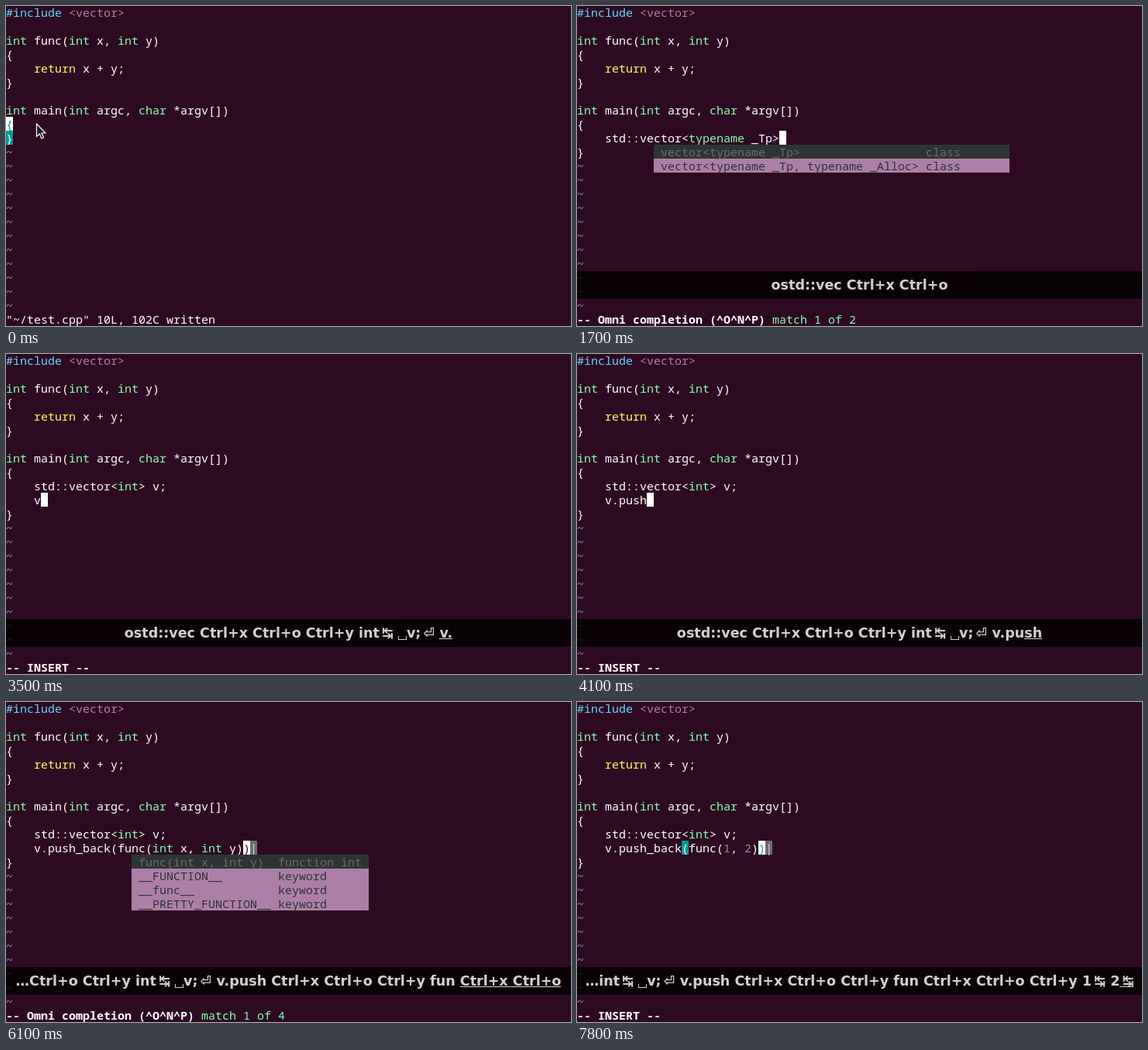
An HTML page for the animation above (8 s loop, 729 by 413 pixels).

```html
<!DOCTYPE html>
<html lang="en">
<head>
<meta charset="utf-8">
<title>Completion in a terminal editor</title>
<style>
  html, body { margin: 0; width: 100%; height: 100%; overflow: hidden; background: #2e0a22; }
  #stage { position: relative; width: 729px; height: 413px; overflow: hidden; background: #2e0a22; }
  #screen, #menu, #status {
    position: absolute; left: 0; margin: 0; white-space: pre; color: #fff;
    font: 15px/18px "Noto Sans Mono", "DejaVu Sans Mono", monospace; font-variant-ligatures: none;
  }
  #screen { top: -1px; }
  #status { top: 395px; }
  #screen div, #menu div { height: 18px; }
  #screen span { display: inline-block; height: 18px; vertical-align: top; }
  .pre { color: #5fd7ff; }
  .const { color: #ad7fa8; }
  .type { color: #87ffaf; }
  .stmt { color: #ffff5f; }
  .tilde { color: #729fcf; }
  .match { background: #06989a; }
  .select { background: #6c6c6c; }
  .conceal { background: #6c6c6c; color: #d3d7cf; }
  .cursor { background: #fff; color: #2e0a22; }
  .cursor.paired { color: #06989a; }
  #menu div { background: #ad7fa8; color: #2e3436; }
  #menu div:first-child { background: #2e3436; color: #6c6c6c; }
  #keys {
    position: absolute; left: 0; top: 342px; width: 729px; height: 36px;
    display: flex; justify-content: center; opacity: .8; background: #000; color: #fff;
    font: bold 17.55px/36px "DejaVu Sans", sans-serif; white-space: pre;
  }
  .fresh { background: linear-gradient(#fff, #fff) 0 calc(100% - 2px) / 100% 1px no-repeat; }
  .sym { padding-left: 3.3px; }
  .space {
    display: inline-block; box-sizing: border-box; width: 11px; height: 5px;
    border: solid #fff; border-width: 0 1.5px 1.5px; vertical-align: -3px;
  }
  #pointer { position: absolute; left: 38px; top: 150px; }
</style>
</head>
<body>
<div id="stage">
  <div id="screen"></div>
  <div id="menu"></div>
  <div id="status"></div>
  <div id="keys"></div>
  <svg id="pointer" width="16" height="24">
    <path d="M1.5 2V18.5L5.3 15L8 21L10.6 19.8L8 14H12.8Z" fill="#1c1c1c" stroke="#fff" stroke-width="1.2"/>
  </svg>
</div>
<script>
const DURATION = 8000, CELL = 9, ROW = 18, LAST_TEXT_ROW = 21;
const el = id => document.getElementById(id);
const span = cls => text => `<span class="${cls}">${text}</span>`;
const escape = text => text.replace(/&/g, '&amp;').replace(/</g, '&lt;');

const [pre, num, type, stmt, tilde, match, select, cursorOn, pairedCursor] =
  ['pre', 'const', 'type', 'stmt', 'tilde', 'match', 'select', 'cursor', 'cursor paired'].map(span);
const cursor = (char = ' ') => cursorOn(char);
const end = span('conceal')('|');
const int = type('int');

const head = [
  pre('#include ') + num('&lt;vector>'), '',
  `${int} func(${int} x, ${int} y)`, '{', `    ${stmt('return')} x + y;`, '}', '',
  `${int} main(${int} argc, ${type('char')} *argv[])`
];

const bold = text => `<b>${text}</b>`;
const INSERT = bold('-- INSERT --'), SELECT = bold('-- SELECT --');
const CTRL_X = bold('-- ^X mode (^]^D^E^F^I^K^L^N^O^Ps^U^V^Y)');
const omni = count => bold('-- Omni completion (^O^N^P) ') + type(`match 1 of ${count}`);

const body = (...lines) => ['{', ...lines.map(line => '    ' + line), '}'];
const vec = rest => body('std::vector' + rest);
const push = rest => body(`std::vector&lt;${int}> v;`, 'v.' + rest);
const back = rest => push('push_back(' + rest);
const template = `&lt;${type('typename')} _Tp>`;
const call = `func(${int} x, ${int} y)`;

const vectorMenu = { row: 10, col: 11, width: 51, items: [
  'vector<typename _Tp>                  class',
  'vector<typename _Tp, typename _Alloc> class'
] };
const pushMenu = { row: 11, col: 9, width: 46, items: [
  'push_back(value_type &&__x)      method void',
  'push_back(const value_type &__x) method void'
] };
const funcMenu = { row: 11, col: 18, width: 34, items: [
  'func(int x, int y)  function int',
  '__FUNCTION__        keyword',
  '__func__            keyword',
  '__PRETTY_FUNCTION__ keyword'
] };

// In the key display, everything after "|" is freshly pressed and underlined.
const omniKeys = 'Ctrl+x Ctrl+o';
const first = `ostd::vec ${omniKeys} Ctrl+y `;
const typed = 'int↹ ␣v;⏎ v.push ';
const second = `${typed}${omniKeys} Ctrl+y `;
const third = `${second}fun ${omniKeys} `;

// Each step lists only what changes.
const steps = [
  [0, { body: [pairedCursor('{'), match('}')], keys: '', menu: null, pointer: true,
        status: '"~/test.cpp" 10L, 102C written' }],
  [300, { body: body(cursor()), status: INSERT, pointer: false }],
  [400, { keys: '|o' }],
  [500, { body: body('s' + cursor()), keys: 'o|s' }],
  [600, { body: body('st' + cursor()), keys: 'o|st' }],
  [700, { body: body('std' + cursor()), keys: 'o|std' }],
  [800, { keys: 'ostd' }],
  [900, { body: ['{', stmt('std') + ':' + cursor(), '}'], keys: 'ostd:' }],
  [1100, { body: body('std::v' + cursor()), keys: 'ostd:|:v' }],
  [1200, { body: body('std::vec' + cursor()), keys: 'ostd::|vec' }],
  [1400, { status: CTRL_X, keys: 'ostd::vec |Ctrl+x' }],
  [1500, { keys: 'ostd::vec |' + omniKeys }],
  [1700, { body: vec(template + cursor()), status: omni(2), menu: vectorMenu, keys: 'ostd::vec ' + omniKeys }],
  [2100, { keys: `ostd::vec ${omniKeys} |Ctrl+y` }],
  [2300, { body: vec(`&lt;${select(type('typename') + ' _T')}${cursor('p')}>${end}`), status: SELECT, menu: null,
           keys: first.trim() }],
  [2400, { body: vec(`&lt;i${cursor('>')}${end}`), status: INSERT, keys: first + '|in' }],
  [2500, { body: vec(`&lt;${int}${cursor('>')}${end}`), keys: first + '|int' }],
  [2700, { body: vec(`&lt;${int}>${cursor()}`), keys: first + 'int↹ |␣' }],
  [2800, { body: vec(`&lt;${int}> v${cursor()}`), keys: first + 'int↹ ␣|v;' }],
  [3000, { body: vec(`&lt;${int}> v;${cursor()}`) }],
  [3100, { keys: first + 'int↹ ␣v;' }],
  [3300, { body: body(`std::vector&lt;${int}> v;`, cursor()) }],
  [3400, { keys: first + 'int↹ ␣v;|⏎' }],
  [3500, { body: body(`std::vector&lt;${int}> v;`, 'v' + cursor()), keys: first + 'int↹ ␣v;⏎ |v.' }],
  [3700, { body: push('p' + cursor()), keys: first + 'int↹ ␣v;⏎ v.|p' }],
  [3900, { body: push('pu' + cursor()), keys: first + 'int↹ ␣v;⏎ v.p|u' }],
  [4000, { body: push('pus' + cursor()), keys: first + 'int↹ ␣v;⏎ v.pu|s' }],
  [4100, { body: push('push' + cursor()), keys: first + 'int↹ ␣v;⏎ v.pu|sh' }],
  [4200, { status: CTRL_X, keys: first + typed + '|Ctrl+x' }],
  [4300, { keys: first + typed + '|' + omniKeys }],
  [4500, { body: back('value_type &amp;&amp;__x)' + cursor()), status: omni(2), menu: pushMenu,
           keys: first + typed + omniKeys }],
  [4900, { body: back('value_type &amp;&amp;__x)') }],
  [5200, { body: back('value_type &amp;&amp;__x)' + cursor()) }],
  [5400, { body: back(select('value_type &amp;&amp;__') + cursor('x') + ')' + end), status: SELECT, menu: null,
           keys: first + second.trim() }],
  [5800, { body: back('fu' + cursor(')') + end), status: INSERT, keys: first + second + '|fu' }],
  [5900, { body: back('fun' + cursor(')') + end), keys: first + second + '|fun' }],
  [6000, { status: CTRL_X, keys: `…${omniKeys} Ctrl+y ${second}fun |Ctrl+x` }],
  [6100, { body: back(call + cursor(')') + end), status: omni(4), menu: funcMenu,
           keys: `…Ctrl+o Ctrl+y ${second}fun |${omniKeys}` }],
  [6300, { keys: `…Ctrl+o Ctrl+y ${third.trim()}` }],
  [6600, { body: back(call + ')|') }],
  [6800, { body: back(call + cursor(')') + end), menu: null, keys: `…Ctrl+y ${third}|Ctrl+y` }],
  [7000, { body: back(`func(${select(int + ' ')}${cursor('x')}, ${int} y))${end}`), status: SELECT,
           keys: `…Ctrl+y ${third}Ctrl+y` }],
  [7300, { body: back(`func(${num(1)}${cursor(',')} ${int} y))${end}`), status: INSERT,
           keys: `…l+y ${third}Ctrl+y |1↹` }],
  [7500, { body: back(`func(${num(1)}, ${select(int + ' ')}${cursor('y')}))${end}`), status: SELECT,
           keys: `…l+y ${third}Ctrl+y 1↹` }],
  [7700, { body: back(`func${match('(')}${num(1)}, ${num(2)}${pairedCursor(')')})${end}`), status: INSERT,
           keys: `…y ${third}Ctrl+y 1↹ |2` }],
  [7800, { body: push(`push_back${match('(')}func(${num(1)}, ${num(2)})${pairedCursor(')')}${end}`),
           keys: `…${third}Ctrl+y 1↹ 2|↹` }]
];

function keyMarkup(text) {
  const [old, fresh = ''] = text.split('|');
  return `<span>${old}<span class="fresh">${fresh}</span></span>`
    .replace(/[↹⏎]/g, span('sym')('$&'))
    .replace(/␣/g, span('space')(''));
}

function drawMenu(menu) {
  el('menu').style.display = menu ? 'block' : 'none';
  if (!menu) return;
  Object.assign(el('menu').style, {
    left: menu.col * CELL + 'px', top: menu.row * ROW - 1 + 'px', width: menu.width * CELL + 'px'
  });
  el('menu').innerHTML = menu.items.map(item => `<div> ${escape(item)}</div>`).join('');
}

function draw(state) {
  const lines = [...head, ...state.body];
  while (lines.length <= LAST_TEXT_ROW) lines.push(tilde('~'));
  el('screen').innerHTML = lines.map(line => `<div>${line}</div>`).join('');
  el('status').innerHTML = state.status;
  el('keys').style.display = state.keys ? 'flex' : 'none';
  el('keys').innerHTML = keyMarkup(state.keys);
  el('pointer').style.display = state.pointer ? 'block' : 'none';
  drawMenu(state.menu);
}

let shown = -1;
function tick() {
  const time = performance.now() % DURATION;
  const count = steps.filter(([start]) => start <= time).length;
  if (count !== shown) {
    shown = count;
    draw(Object.assign({}, ...steps.slice(0, count).map(([, change]) => change)));
  }
  requestAnimationFrame(tick);
}
tick();
</script>
</body>
</html>
```
